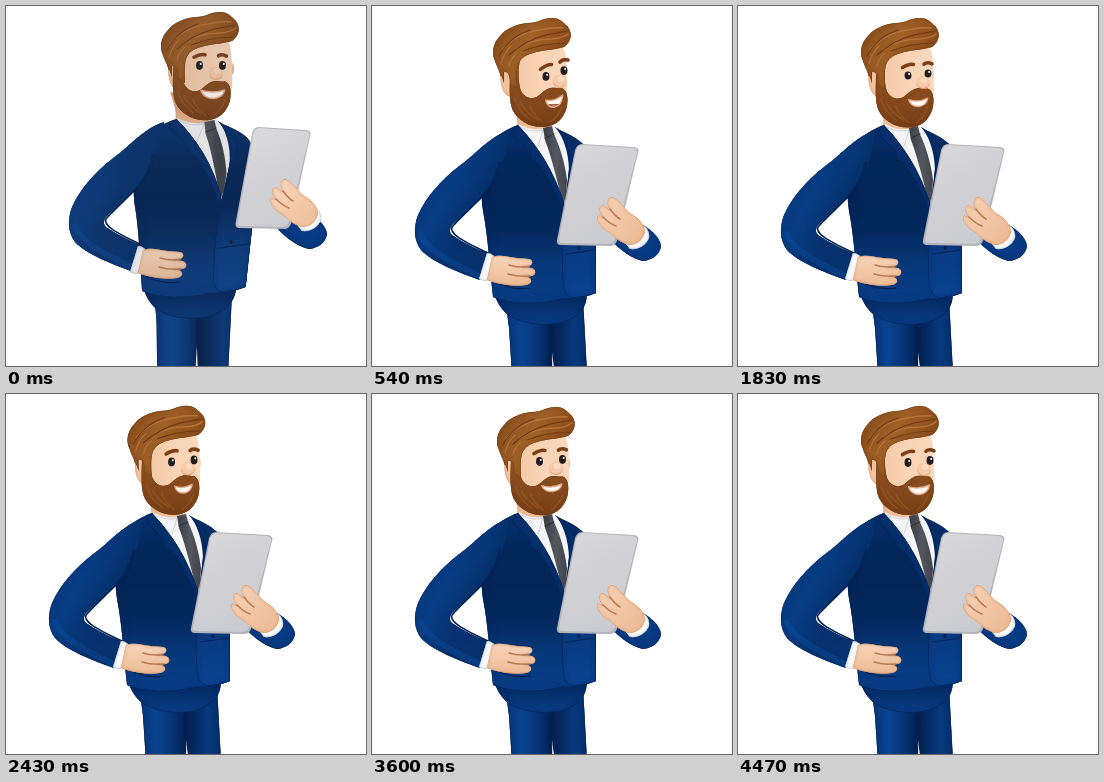
Animation of 360x360 px, one loop 4500 ms. Source, as an HTML page with a canvas:

```html
<!DOCTYPE html>
<html>
<head>
<meta charset="utf-8">
<title>Businessman with tablet</title>
<style>
html, body { margin: 0; width: 100%; height: 100%; overflow: hidden; background: #fff; }
canvas { display: block; width: 360px; height: 360px; }
</style>
</head>
<body>
<canvas id="stage" width="360" height="360"></canvas>
<script>
const ctx = document.getElementById('stage').getContext('2d');
const LOOP = 4500, STEP = 30, SETTLE = 480;

const SKIN = '#f8d3b4', SKIN_SHADE = '#d9986e', HAIR = '#96551f', HAIR_DARK = '#6f3a12',
  HAIR_LIGHT = '#b5733a', BEARD = '#874b1e', NAVY = '#021f50', BLUE = '#073b83';

// Head pose over time: head offset, extra face offset, eye gap and tilt, lid, mouth width, height, teeth share
const KEYS = [
  { t: 0,    hx: 32, hy: -6, fx: -8,  fy: -2,  gap: 23, tilt: 0,   lid: 1,   mw: 24, mh: 9,  teeth: 1 },
  { t: 480,  hx: -2, hy: 0,  fx: 4,   fy: 0,   gap: 18, tilt: 3,   lid: 1,   mw: 17, mh: 10, teeth: .55 },
  { t: 990,  hx: -1, hy: 0,  fx: 2,   fy: 0,   gap: 18, tilt: 2,   lid: 1,   mw: 18, mh: 7,  teeth: .6 },
  { t: 1830, hx: 0,  hy: 0,  fx: -1,  fy: 1,   gap: 20, tilt: 1,   lid: .9,  mw: 19, mh: 8,  teeth: 1 },
  { t: 2300, hx: -1, hy: 0,  fx: -2,  fy: 0,   gap: 22, tilt: 1,   lid: 1,   mw: 18, mh: 8,  teeth: .8 },
  { t: 2970, hx: -6, hy: -2, fx: -9,  fy: -4,  gap: 27, tilt: 1,   lid: 1.1, mw: 14, mh: 9,  teeth: .45 },
  { t: 3600, hx: 2,  hy: 1,  fx: -4,  fy: -2,  gap: 23, tilt: 1,   lid: 1,   mw: 20, mh: 7,  teeth: 1 },
  { t: 4470, hx: 0,  hy: 0,  fx: 0,   fy: 0,   gap: 22, tilt: 1,   lid: 1,   mw: 21, mh: 9,  teeth: 1 }
];

const smooth = u => u * u * (3 - 2 * u);
const clamp = u => Math.max(0, Math.min(1, u));

function poseAt(t) {
  let i = 0;
  while (i < KEYS.length - 2 && t >= KEYS[i + 1].t) i++;
  const a = KEYS[i], b = KEYS[i + 1], u = smooth(clamp((t - a.t) / (b.t - a.t)));
  const pose = {};
  for (const k in a) pose[k] = a[k] + (b[k] - a[k]) * u;
  return pose;
}

// Moves every "x,y" pair of path data by the offset that move(x, y) returns
const path = (d, move) => new Path2D(d.replace(/(-?[\d.]+),(-?[\d.]+)/g, (_, x, y) => {
  const [dx, dy] = move(+x, +y);
  return (+x + dx).toFixed(2) + ',' + (+y + dy).toFixed(2);
}));

function line(p, color, width) {
  ctx.strokeStyle = color;
  ctx.lineWidth = width;
  ctx.stroke(p);
}

// Fill with a soft dark rim inside the outline
function solid(p, fill, shade, blur = 8) {
  ctx.fillStyle = fill;
  ctx.fill(p);
  if (!shade) return;
  ctx.save();
  ctx.clip(p);
  ctx.shadowColor = shade;
  ctx.shadowBlur = blur;
  line(p, shade, 1);
  ctx.restore();
}

function ramp(x0, y0, x1, y1, ...colors) {
  const g = ctx.createLinearGradient(x0, y0, x1, y1);
  colors.forEach((c, i) => g.addColorStop(i / (colors.length - 1), c));
  return g;
}

function ellipse(x, y, rx, ry, fill) {
  ctx.fillStyle = fill;
  ctx.beginPath();
  ctx.ellipse(x, y, rx, ry, 0, 0, 7);
  ctx.fill();
}

function drawBody(lean) {
  const shift = (dx, dy) => () => [dx * lean, dy * lean];
  const torso = (x, y) => [lean * (15 + (293 - y) / 160 * (7 + (x - 130) * .11)), -6 * lean];
  const T = d => path(d, torso);
  const L = lean * 16;

  // Trousers
  solid(T('M172,300 L178,340 L185,385 L216,385 L211,292Z'),
    ramp(175 + L, 0, 215 + L, 0, '#031d49', '#04295f', '#07387c', '#06316e'), NAVY, 5);
  solid(T('M133,292 L137,322 L141,385 L182,385 L179,340 L177,300Z'),
    ramp(136 + L, 0, 181 + L, 0, '#073a80', '#0a438f', '#063475', '#031f4e'), NAVY, 5);
  solid(T('M180,346 L181,385 L185,385Z'), '#fff');
  solid(T('M122,288 C128,304 136,311 148,315 C166,321 190,319 201,312 C211,306 215,298 215,286Z'),
    ramp(0, 290, 0, 320, '#03285f', '#093f8a'), NAVY, 5);

  // Jacket, with the lighter right front
  solid(T('M146,119 C135,123 124,129 118,139 C108,155 108,180 111,205 C116,230 118,265 121,291 ' +
    'C138,299 168,299 190,293 C202,294 214,291 224,287 L224,230 C228,190 226,155 211,138 C203,130 192,126 181,121Z'),
    ramp(0, 120, 0, 296, '#073272', '#042759', '#032456', '#04295e', '#07387b', '#083d86'), NAVY, 8);
  solid(T('M191,207 C189,235 190,262 191,278 Q192,290 201,292 Q214,291 224,287 L224,205Z'),
    ramp(0, 205, 0, 290, '#04295f', '#083c83', '#0a4390'), NAVY, 5);

  // Neck, shirt and tie
  solid(T('M139,92 C143,104 146,111 145,121 C154,131 172,133 176,124 L178,100Z'),
    ramp(0, 100, 0, 128, '#dea57d', '#f4c7a2'));
  solid(T('M147,118 C154,123 166,125 174,122 L182,119 C190,128 197,145 197,165 L192,200 C183,178 168,153 147,124Z'),
    '#f5f5f7');
  line(T('M149,121 Q160,127 171,124 L166,140'), '#cfd3dc', 1);
  solid(T('M171,122 L180,120 L182,128 C188,141 193,157 195,174 L194,190 L191,199 C186,178 180,152 173,134Z'),
    ramp(172 + L, 0, 196 + L, 0, '#3c3e46', '#55575f', '#3f4149'));
  line(T('M173,132 L182,128'), '#292b32', 1);

  // Lapels and seams
  solid(T('M146,119 C142,121 140,124 140,128 L157,146 L159,154 L166,157 C177,174 186,190 191,209 L192,196 C184,172 171,145 146,119Z'),
    '#06316d', NAVY, 4);
  solid(T('M183,121 C189,127 195,138 198,151 L195,185 L203,150 C202,138 195,128 183,121Z'), '#06316d', NAVY, 4);
  line(T('M195,248 L222,244 M122,275 C132,281 145,284 158,282'), NAVY, 1.2);
  ellipse(207 + lean * 18, 242 - lean * 6, 1.5, 2, '#021d4a');

  // Bent arm
  const A = d => path(d, shift(20, -8));
  solid(A('M138,124 C118,130 105,147 86,161 C69,174 54,191 46,209 C41,222 42,235 49,244 ' +
    'C61,257 88,267 108,274 L118,248 C104,243 90,236 80,229 Q76,225 80,219 C92,208 102,199 111,190 C123,180 134,155 138,124Z'),
    ramp(75, 190, 125 + L, 215, '#083c83', '#06336f', '#06326d'), '#042a62', 8);
  line(A('M111,190 C98,203 88,212 80,221 C77,227 88,234 116,247'), NAVY, 1.6);
  line(A('M111,190 C119,181 125,170 128,157'), 'rgba(2,24,66,.5)', 3);
  line(A('M49,228 C53,241 74,255 108,270'), 'rgba(14,80,165,.35)', 6);

  const H = d => path(d, shift(17, -7));
  solid(H('M115,247 Q119,247 122,250 L115,275 Q110,275 107,273Z'), '#fafafa', '#bcc3d2', 3);
  solid(H('M120,251 C128,248 137,251 145,252 L157,253 C162,254 161,260 156,260 L150,261 L160,262 ' +
    'C165,264 164,270 159,270 L151,270 L156,271 C161,273 160,278 154,279 C142,281 125,278 115,274Z'),
    ramp(0, 248, 0, 281, '#f8d6ba', '#ecba94'), SKIN_SHADE, 3);
  line(H('M137,259 Q146,262 157,260.5 M136,268 Q146,271 158,270'), '#b97b55', 1.5);
}

function drawTablet(lean) {
  const shift = (dx, dy) => () => [dx * lean, dy * lean];
  solid(path('M262,215 C278,221 288,231 289,240 C288,248 281,254 271,255 C261,253 249,245 239,234Z', shift(32, -12)),
    BLUE, NAVY, 6);
  solid(path('M269,219 C275,220 278,227 277,232 C274,239 267,244 258,243 L254,238Z', shift(38, -18)),
    '#fbfbfb', '#b9c1cf', 3);

  const slab = (x, y) => [lean * (43 - (x - 205) * .08), -17 * lean];
  solid(path('M210,138 L262,141 Q268,142 266,147 L245,235 Q243,240 238,240 L189,239 Q184,239 185,234 L203,144 Q205,138 210,138Z', slab),
    '#b4b5bb');
  solid(path('M211,139 L261,142 Q266,143 265,147 L243,233 Q241,238 236,238 L191,237 Q186,237 187,233 L204,145 Q206,139 211,139Z', slab),
    ramp(190 + 43 * lean, 140, 250 + 43 * lean, 240, '#d9d9dc', '#d0d0d4', '#c9cacf'));

  const H = d => path(d, shift(39, -18));
  solid(H('M240,191 C246,192 252,202 258,207 C267,212 273,219 273,226 C271,234 265,239 257,239 ' +
    'C249,237 242,231 238,227 C231,224 224,215 225,211 C226,208 229,210 231,212 C226,205 226,200 231,199 L238,204 C234,198 235,191 240,191Z'),
    ramp(225 + 39 * lean, 195, 270 + 39 * lean, 235, '#f6d2b5', '#ecba94'), SKIN_SHADE, 3);
  line(H('M238,203 Q243,210 248,213 M231,211 Q238,218 244,220'), '#b97b55', 1.5);
}

function drawHead(p) {
  const at = k => () => [p.hx + k * p.fx, p.hy + k * p.fy];
  const P = (d, k) => path(d, at(k));
  const fx = p.hx + p.fx, fy = p.hy + p.fy;

  // Skull, ears and face
  solid(P('M130,40 C126,55 129,70 135,80 L147,100 L180,60 L160,35Z', 0), HAIR, HAIR_DARK, 5);
  ellipse(192.5 + p.hx, 69 + p.hy, 3.7, 7, '#f0bd97');
  solid(P('M141,54 C150,42 184,34 193,43 C196,53 196,65 196,76 C198,96 189,112 171,113 C151,112 142,95 140,78Z', .25),
    ramp(140 + p.hx, 0, 198 + p.hx, 0, '#f3c7a3', SKIN, '#fbd9bd'));
  solid(P('M140,66 C133,62 129,69 131,78 C133,87 137,92 142,90Z', 0), '#f3c6a2', SKIN_SHADE, 4);

  // Beard with the sideburn
  solid(P('M139,58 L148,56 C146,66 147,76 149,84 C152,91 159,94 165,91 C170,88 173,83 179,82 ' +
    'C184,81 187,83 190,82 C196,84 197,93 195,102 C192,112 185,120 173,121 C158,122 146,114 141,104 C137,95 138,80 139,58Z', .4),
    ramp(0, 60 + p.hy, 0, 122 + p.hy, HAIR, BEARD, '#753d15'), HAIR_DARK, 5);
  line(P('M143,92 Q147,106 159,114 M149,97 Q154,106 166,114 M158,100 Q161,108 171,116 M190,101 Q187,110 179,116', .4),
    'rgba(185,116,55,.35)', 1.2);

  // Mouth
  const mx = 181 + fx - p.fx * .2, my = 92 + fy, w = p.mw / 2;
  const mouth = new Path2D();
  mouth.moveTo(mx - w, my + p.tilt * .7);
  mouth.quadraticCurveTo(mx, my + 4, mx + w, my - p.tilt);
  mouth.bezierCurveTo(mx + w * .9, my + p.mh * 1.15, mx - w * .7, my + p.mh * 1.35, mx - w, my + p.tilt * .7);
  ctx.save();
  ctx.clip(mouth);
  ctx.fillStyle = '#6b2c24';
  ctx.fillRect(mx - w, my - 4, 2 * w, p.mh + 10);
  ellipse(mx, my + p.mh, w * .7, 3, '#d98474');
  ctx.fillStyle = '#fffaf4';
  ctx.fillRect(mx - w, my - 4, 2 * w, 4 + p.mh * p.teeth * 1.15);
  ctx.restore();
  line(mouth, '#e3ab88', 1.4);

  // Nose
  ellipse(186 + fx, 76 + fy, 7, 6, '#e2a680');
  ellipse(186 + fx, 74.7 + fy, 6.9, 6.2, '#f7c9a8');
  ellipse(187 + fx, 73 + fy, 3.5, 3, '#fbdac1');

  // Eyes and brows
  for (const side of [-1, 1]) {
    const x = 181 + fx + side * p.gap / 2, y = 67.5 + fy - side * p.tilt;
    ellipse(x + .3, y, 3.9, 4.6 * p.lid, '#fdeee2');
    ellipse(x, y, 3.5, 4.4 * p.lid, '#241a19');
    ellipse(x + 1.2, y - 1.6, 1, 1.1, '#fff');
    const brow = new Path2D(), reach = side < 0 ? 5.5 : 4;
    brow.moveTo(x - reach, y - 9 - side * .7 + p.tilt * .4);
    brow.quadraticCurveTo(x - side, y - 12, x + reach, y - 10 + side * .7 - p.tilt * .4);
    line(brow, '#7b3f16', 3.6);
  }

  // Hair
  solid(P('M134,77 C131,67 127,62 125,55 C121,47 123,37 130,30 C136,22 147,18 158,17 ' +
    'C168,17 172,12 182,12 C190,12 194,17 198,21 C203,28 201,36 194,41 C184,44 172,44 163,47 ' +
    'C155,49 150,53 148,59 C146,66 147,74 147,83 L140,78 C140,68 137,65 134,66Z', 0),
    ramp(125 + p.hx, 15 + p.hy, 195 + p.hx, 48 + p.hy, '#83491b', '#a06127', '#8b4b1a'), HAIR_DARK, 5);
  line(P('M132,44 Q146,27 170,24 Q184,21 193,22 M146,43 Q160,33 182,33 Q193,32 198,28', 0), HAIR_LIGHT, 1.6);
  line(P('M129,50 Q139,31 160,24 M139,49 Q154,35 176,29 Q187,27 197,25 M153,45 Q169,38 195,37', 0), HAIR_DARK, 1.2);
  line(P('M131,58 Q134,46 141,40 M139,60 Q140,53 147,47', 0), HAIR_LIGHT, 1.1);
}

// Slightly dimmer light on the figure while it leans away
function dim(amount) {
  ctx.globalCompositeOperation = 'source-atop';
  ctx.fillStyle = `rgba(70,70,75,${amount})`;
  ctx.fillRect(0, 0, 360, 360);
  ctx.globalCompositeOperation = 'source-over';
}

function frame(now) {
  const t = Math.floor(now % LOOP / STEP) * STEP;
  const lean = 1 - smooth(clamp(t / SETTLE));
  ctx.clearRect(0, 0, 360, 360);
  ctx.lineCap = ctx.lineJoin = 'round';
  drawBody(lean);
  drawHead(poseAt(t));
  dim(.1 * lean);
  drawTablet(lean);
}

let start;
function tick(now) {
  start ??= now;
  frame(now - start);
  requestAnimationFrame(tick);
}
frame(0);
requestAnimationFrame(tick);
</script>
</body>
</html>
```
